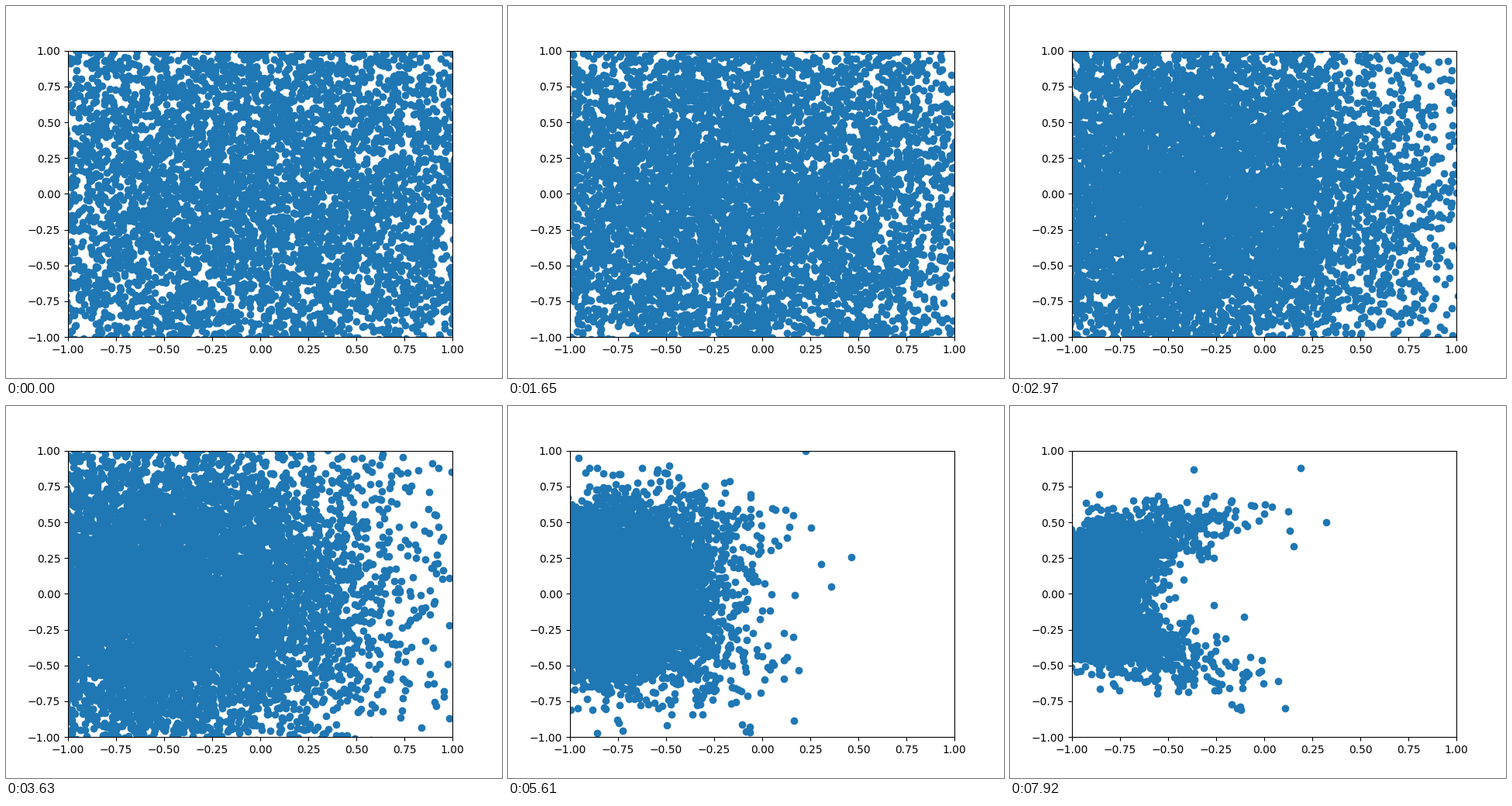
A matplotlib script that plays this animation: 640x480 px, repeating every 8 s.

```python
import numpy as np
import matplotlib.pyplot as plt
from matplotlib.animation import FuncAnimation

LOOP, TICK, HOLD = 8000, 40, 330
STEPS = LOOP // HOLD
COUNT = 10000

# Schedule: the cloud at each step is pull * shape + spread * noise
KEYS = [0, 5, 9, 13, 17, 21, 24]
PULL = np.interp(range(STEPS + 1), KEYS, [0, .24, .48, .70, .87, .95, 1.0])
SPREAD = np.interp(range(STEPS + 1), KEYS, [1, .87, .66, .42, .225, .155, .115])

# Target shape: a parabola opening to the right, densest at its tip
bend = np.linspace(-.95, .95, 91)
curve = np.column_stack([2.6 * bend**2 - 1, bend])
log_weight = -.5 * (bend / .2)**2


def expected_target(p, pull, spread):
    """Mean point of the curve that a noisy particle belongs to."""
    d2 = ((p[:, None, :] - pull * curve[None])**2).sum(axis=2)
    logit = log_weight - d2 / (2 * spread**2)
    w = np.exp(logit - logit.max(axis=1, keepdims=True))
    return w @ curve / w.sum(axis=1, keepdims=True)


def flow():
    p = np.random.default_rng(7).standard_normal((COUNT, 2))
    path = [p]
    for k in range(STEPS):
        goal = expected_target(p, PULL[k], SPREAD[k])
        noise = (p - PULL[k] * goal) / SPREAD[k]
        p = PULL[k + 1] * goal + SPREAD[k + 1] * noise
        path.append(p)
    return path


path = flow()

fig, ax = plt.subplots(figsize=(6.4, 4.8), dpi=100)
dots = ax.scatter(*path[0].T)
ax.set(xlim=(-1, 1), ylim=(-1, 1))


def update(i):
    step = (i * TICK + TICK - 1) // HOLD
    dots.set_offsets(path[min(step, STEPS)])
    return dots,


anim = FuncAnimation(fig, update, frames=LOOP // TICK, interval=TICK,
                     repeat=True, repeat_delay=0)
plt.show()
```
